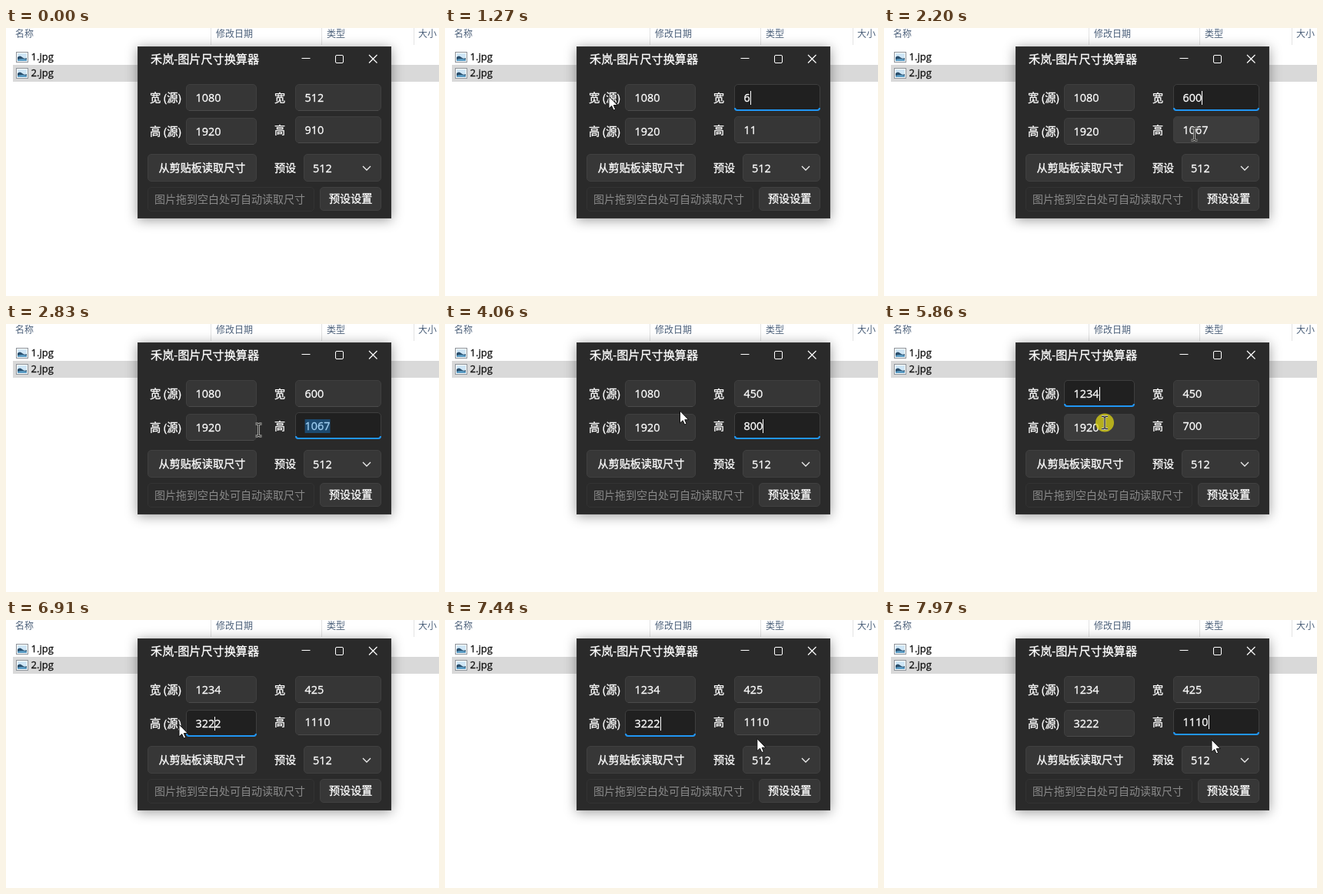
These frames come from a looping animation (563 by 349 pixels, 7.99 s). An HTML page:

```html
<!DOCTYPE html>
<html lang="zh-CN">
<head>
<meta charset="utf-8">
<title>图片尺寸换算器</title>
<style>
  html, body { margin: 0; width: 100%; height: 100%; overflow: hidden; background: #fff; }
  svg { display: block; width: 563px; height: 349px; font: 14px 'Open Sans', 'Noto Sans CJK SC', 'Noto Sans CJK', sans-serif; }
  text { white-space: pre; stroke-width: .3px; }
  .window { filter: drop-shadow(0 2px 8px rgba(0, 0, 0, .4)); }
  .digits { font-size: 14.4px; }
</style>
</head>
<body>
<svg id="stage" viewBox="0 0 563 349">
  <defs>
    <g id="photo">
      <rect x=".5" y=".5" width="15" height="13" fill="#fff" stroke="#8c939a"/>
      <rect x="2" y="2" width="12" height="10" fill="#cfe6f6"/>
      <path d="M2 7q3-3 6 0t6 1v4H2z" fill="#2b4f6c"/>
      <path d="M2 10q6-2 12 0v2H2z" fill="#5b9cc4"/>
    </g>
  </defs>
</svg>
<script>
const LOOP = 7990, DIGIT = 8.24;
const stage = document.getElementById('stage');

function add(tag, attrs, parent = stage) {
  const el = document.createElementNS('http://www.w3.org/2000/svg', tag);
  for (const key in attrs) el.setAttribute(key, attrs[key]);
  parent.append(el);
  return el;
}
function label(text, x, y, size = 14.1, fill = '#fff', stroke = fill) {
  const el = add('text', { x, y, fill, stroke, 'font-size': size });
  el.textContent = text;
  return el;
}
function box(x, y, width, height, fill, stroke, rx = 4.5) {
  return add('rect', { x: x + .5, y: y + .5, width: width - 1, height: height - 1, rx, fill, stroke });
}
function line(d, stroke = '#fff', width = 1) {
  return add('path', { d, fill: 'none', stroke, 'stroke-width': width });
}

// File list
add('rect', { x: 9, y: 48, width: 554, height: 22, fill: '#d9d9d9' });
line('M266.5 0V22M410.5 0V22M530.5 0V22', '#e3e3e3');
[['名称', 12], ['修改日期', 273], ['类型', 417], ['大小', 536]]
  .forEach(([text, x]) => label(text, x, 12, 12, '#4c607a', 'none'));
[['1.jpg', 31], ['2.jpg', 52]].forEach(([name, y]) => {
  add('use', { href: '#photo', x: 13, y });
  label(name, 32.5, y + 11, 13, '#111');
});

// Converter window
add('rect', { x: 171, y: 24, width: 330, height: 224, fill: '#2a2a2a', class: 'window' });
box(171, 24, 330, 224, 'none', '#353535', 0);
label('禾岚-图片尺寸换算器', 188, 45.5, 15.15);
line('M384.5 39.5H395.5');
line('M472 35L482.5 45.5M482.5 35L472 45.5', '#fff', 1.2);
add('rect', { x: 428.5, y: 35.5, width: 10, height: 10, rx: 1.5, fill: 'none', stroke: '#fff' });
label('宽 (源)', 187, 96, 14.3);
label('高 (源)', 187, 140, 14.3);
label('宽', 349, 96);
label('高', 349, 138);

box(184, 164, 142, 36, '#373737', '#404040');
label('从剪贴板读取尺寸', 198.5, 187);
label('预设', 349, 187);
box(387, 164, 101, 36, '#373737', '#404040');
label('512', 399, 188, 14.4);
line('M464 180L469 185L474 180', '#eee', 1.3);
box(184, 207, 217, 32, '#2b2b2b', '#333');
label('图片拖到空白处可自动读取尺寸', 193, 228, 14, '#8a8a8a', 'none');
box(408, 207, 80, 31, '#373737', '#404040');
label('预设设置', 420, 226.5);

function makeField(x, y, width) {
  const height = 35, textX = x + 12.6, baseline = y + 23;
  const frame = box(x, y, width, height, '#363636', '#3f3f3f');
  const edge = line(`M${x + 4} ${y + height - .5}H${x + width - 4}`, '#4b4b4b');
  const focusBar = line(`M${x + 1} ${y + 31}Q${x + 1} ${y + 34} ${x + 4} ${y + 34}H${x + width - 4}Q${x + width - 1} ${y + 34} ${x + width - 1} ${y + 31}`, '#2196f3', 2);
  const mark = add('rect', { y: y + 9, height: 18, fill: '#1c4a70' });
  const text = label('', textX, baseline);
  text.setAttribute('class', 'digits');
  const chosen = add('tspan', { fill: '#a0cff2', stroke: '#a0cff2' }, text);
  const plain = document.createTextNode('');
  text.prepend(plain);
  const caret = add('rect', { y: y + 9, width: 1, height: 18, fill: '#fff' });
  const contains = p => p.x >= x && p.x <= x + width && p.y >= y && p.y <= y + height;

  function draw(value, focused, selecting, back, pointer) {
    const n = value.length;
    const at = Math.round((pointer.x - textX) / DIGIT);
    const start = selecting ? Math.max(0, Math.min(n, at)) : n;
    plain.data = value.slice(0, start);
    chosen.textContent = value.slice(start);
    mark.setAttribute('x', textX + start * DIGIT);
    mark.setAttribute('width', (n - start) * DIGIT);
    caret.setAttribute('x', Math.round(textX + (n - back) * DIGIT));
    caret.style.display = focused && start === n ? '' : 'none';
    focusBar.style.display = focused ? '' : 'none';
    edge.style.display = focused ? 'none' : '';
    frame.setAttribute('fill', focused ? '#202020' : contains(pointer) ? '#3c3c3c' : '#363636');
  }
  return { draw, contains };
}

const fields = {
  srcW: makeField(234, 73, 92),
  srcH: makeField(234, 117, 92),
  w: makeField(376, 73, 112),
  h: makeField(376, 115, 112)
};

// Each step overrides part of the state from its time on
const steps = [
  [0, { srcW: '1080', srcH: '1920', w: '512', h: '910', focus: '', selecting: false, back: 0 }],
  [300, { focus: 'w', selecting: true }],
  [1270, { w: '6', h: '11', selecting: false }],
  [1670, { w: '60', h: '107' }],
  [1830, { w: '600', h: '1067' }],
  [2580, { focus: 'h', selecting: true }],
  [2980, { h: '8', w: '4', selecting: false }],
  [3130, { h: '80', w: '45' }],
  [3260, { h: '800', w: '450' }],
  [4310, { focus: 'srcW', selecting: true }],
  [4860, { srcW: '1', selecting: false }],
  [5030, { srcW: '12' }],
  [5240, { srcW: '123', h: '7024' }],
  [5400, { srcW: '1234', h: '700' }],
  [5890, { focus: 'srcH', selecting: true }],
  [6340, { srcH: '3', w: '411', h: '1', selecting: false }],
  [6590, { srcH: '32' }],
  [6630, { w: '424', h: '11' }],
  [6770, { srcH: '322', w: '425', h: '111' }],
  [6900, { srcH: '3222', h: '1110', back: 1 }],
  [6940, { back: 0 }],
  [7690, { focus: 'h' }]
];

// Pointer path: time, x, y
const path = [
  [30, 492, 314], [270, 424, 92], [330, 420, 92], [620, 213, 89],
  [1900, 213, 89], [2300, 438, 147], [2440, 426, 134], [2600, 424, 134], [2800, 328.5, 138],
  [3850, 328.5, 138], [4250, 286, 92], [4340, 286, 92], [4620, 199, 77.5],
  [5450, 199, 77.5], [5830, 287, 128.5], [5890, 287, 128.5], [6030, 189, 129],
  [6339, 189, 129], [6340, 225, 136],
  [6940, 225, 136], [7540, 420, 156], [7650, 418, 138], [7790, 418, 138], [7970, 426, 156]
];
const presses = [[290, 640], [2560, 2810], [4290, 4640], [5850, 6050], [7680, 7780]];
const beamHolds = [[290, 650], [2560, 3850], [4290, 4670], [5850, 6190]];

const halo = add('circle', { r: 12, fill: '#dcd214', 'fill-opacity': .76 });
const arrow = add('path', {
  d: 'M0 0V16L3.7 12.6L6.1 18L8.6 16.9L6.3 11.6H11.3Z',
  fill: '#fff', stroke: '#111'
});
const beam = add('g', { fill: 'none' });
for (const [stroke, width] of [['#c4c4c0', 2.8], ['#1c1c1c', 1.1]]) {
  add('path', { d: 'M-4 -8H-1.5L0 -7L1.5 -8H4M0 -7V7M-4 8H-1.5L0 7L1.5 8H4', stroke, 'stroke-width': width }, beam);
}

const within = (spans, t) => spans.some(([a, b]) => t >= a && t < b);

function pointerAt(t) {
  const next = path.findIndex(p => p[0] > t);
  if (next < 1) {
    const [, x, y] = path[next < 0 ? path.length - 1 : 0];
    return { x, y };
  }
  const [t0, x0, y0] = path[next - 1], [t1, x1, y1] = path[next];
  const k = (t - t0) / (t1 - t0), e = k * k * (3 - 2 * k);
  return { x: x0 + (x1 - x0) * e, y: y0 + (y1 - y0) * e };
}

function render(t) {
  const state = Object.assign({}, ...steps.filter(s => s[0] <= t).map(s => s[1]));
  const pointer = pointerAt(t);
  let isBeam = within(beamHolds, t);
  for (const name in fields) {
    const focused = state.focus === name;
    fields[name].draw(state[name], focused, focused && state.selecting, state.back, pointer);
    isBeam = isBeam || fields[name].contains(pointer);
  }
  const visible = t >= 30;
  const show = (el, on) => {
    el.style.display = on ? '' : 'none';
    el.setAttribute('transform', `translate(${pointer.x} ${pointer.y})`);
  };
  show(halo, within(presses, t));
  show(beam, visible && isBeam);
  show(arrow, visible && !isBeam);
}

const begin = performance.now();
function tick() {
  render((performance.now() - begin) % LOOP);
  requestAnimationFrame(tick);
}
tick();
</script>
</body>
</html>
```
